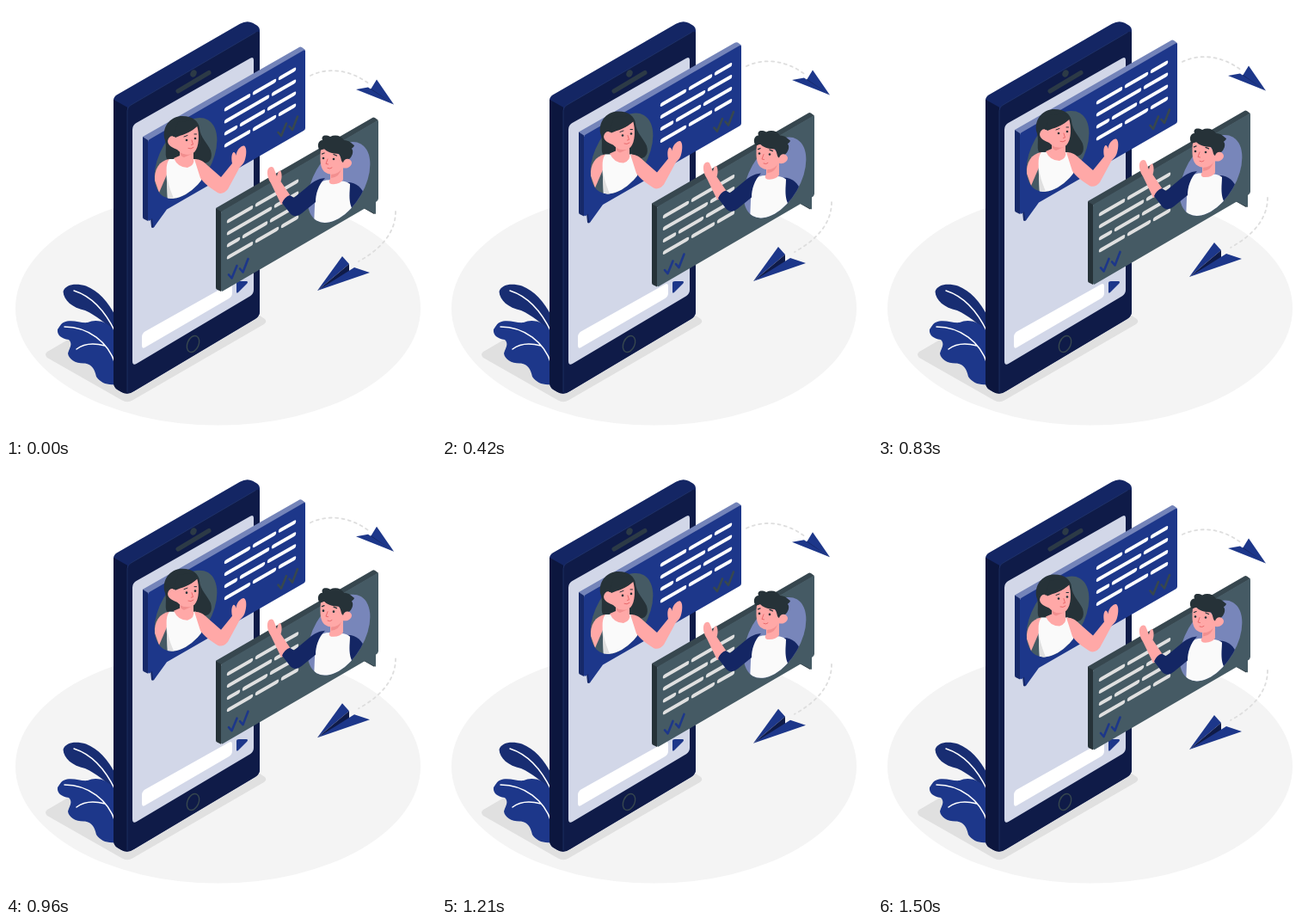
Recreate the animation shown at these times as an HTML page. Size 500 by 500 pixels, loop 1.54 s.

```html
<!DOCTYPE html>
<html lang="en">
<head>
<meta charset="utf-8">
<title>Chat bubbles</title>
<style>
html, body { margin: 0; width: 100%; height: 100%; overflow: hidden; background: #fff; }
svg { display: block; width: 100%; height: 100%; }
.blue { fill: #1d378a; }
.navy { fill: #142664; }
.deep { fill: #0f1b48; }
.ink { fill: #263238; }
.slate { fill: #455a64; }
.skin { fill: #ffa8a7; }
.shirt { fill: #fafafa; }
.line { fill: none; stroke-linecap: round; stroke-linejoin: round; }
</style>
</head>
<body>
<svg viewBox="0 0 500 500">
  <defs>
    <path id="rows" class="line" stroke-width="4.500" transform="skewY(-30)"
      d="M2 0H28M35 0H58M65 0H81M2 14H50M57 14H81M2 28H13M20 28H45M52 28H81M2 42H28M35 42H58M65 42H81"/>
    <path id="ticks" class="line" stroke-width="2.600" d="M0 12.500L3.500 16.500L9.500 2M13 5.500L16.500 9.500L22.500 -6"/>
    <circle id="disc" r="42" transform="matrix(.866 -.5 0 1 0 0)"/>
    <clipPath id="girlClip"><circle r="42" transform="matrix(.866 -.5 0 1 209 177)"/></clipPath>
    <clipPath id="manClip"><circle r="42" transform="matrix(.866 -.5 0 1 387 205)"/></clipPath>
  </defs>

  <!-- floor and shadow -->
  <ellipse cx="246.500" cy="351.500" rx="235.500" ry="136" fill="#f4f4f4"/>
  <path fill="#e0e0e0" d="M48 402L120 360L295 360L301 364Q304 367 300 370L147 458.500Q141 462 135 458.500L48 409Q44 405 48 402Z"/>

  <!-- plant -->
  <path fill="#182d72" d="M127 380C115 368 105 360 92 354C77 351 67 342 66.500 332C69 323 82 322 93 325.500C107 331 119 344 127 360Z"/>
  <path class="blue" d="M127 440C117 441 110 438 105 431C103 422 100 417 92 415.500C81 416 73 411 72 404C74 397 78 393 73 388C64 387 59 382 60 376C63 372 64 368 71 366.500C80 365 88 369 95 368C105 363 119 367 127 379Z"/>
  <path class="line" stroke="#fff" stroke-width="1.500" d="M79 331C101 338 116 356 127 379M68 373C96 373 119 391 127 416M82 399C91 392 104 392 115 395"/>

  <!-- phone -->
  <g transform="translate(0 .8)">
    <path class="navy" d="M125 109Q125 105 129 102.500L272 20Q280 15.500 287 19L292 22Q295 24 295 28V354Q295 360 290 363L149 447Q141 452 134 448L129 445Q125 442 125 437Z"/>
    <path fill="#0c163e" d="M125 108L141 117V450Q137 450 134 448L129 445Q125 442 125 437Z"/>
    <path class="deep" d="M141 121Q141 117 145 114.500L290 30Q295 27 295 32V354Q295 360 290 363L149 447Q145 450 141 450Z"/>
    <path class="line" stroke="#24396f" stroke-width=".7" d="M141 448V121Q141 117 145 114.500L290 30"/>
    <path fill="#d2d7e8" d="M147 143Q147 138 151 135.500L284 60Q288 57.500 288 62V329Q288 334 284 336.500L152 415Q147 418 147 412Z"/>
    <path fill="#fff" d="M158 384Q158 380 162 377.500L259 323Q263 320.500 263 325V333Q263 337 259 339.500L162 396Q158 398.500 158 394Z"/>
  </g>
  <path class="line" stroke="#2c3a46" stroke-width="5" d="M200 99L236 77.500"/>
  <ellipse cx="218" cy="78.500" rx="3.500" ry="4.300" transform="rotate(25 218 78.500)" fill="#2c3a46"/>
  <ellipse cx="217.500" cy="393" rx="6.500" ry="10" transform="rotate(24 217.500 393)" fill="none" stroke="#37474f" stroke-width="1.400"/>
  <path class="blue" d="M268 322Q268 320 271 320H280Q282 321 280 323L270 333Q268 335 268 332Z"/>

  <g id="bubbles">
    <!-- her message -->
    <path fill="#7484b9" d="M159 152L340 48.500Q342 47 344 48L348 51L165 157Z"/>
    <path fill="#162969" d="M159 152L165 156V250L160 247.500Q159 247 159 245ZM168 247L169 257Q170 259 172 257L180 242Z"/>
    <path class="blue" d="M165 158Q165 156 167 155L346 51.500Q348 50.500 348 52.500V142Q348 144 346 145L187 236.500L171.500 258L170 247L167 249.500Q165 250.500 165 248Z"/>
    <use href="#disc" x="209" y="177" class="slate"/>
    <use href="#rows" transform="translate(254 121)" stroke="#fff"/>
    <use href="#ticks" x="316.500" y="134.500" stroke="#37474f"/>

    <path class="ink" d="M184 153C182 138 193 128 205 128C217 128 224 134 225 142C226 153 234 159 238 168C241 178 236 183 229 183C224 183 219 179 214 177L187 178C184 172 188 163 184 153Z"/>
    <g clip-path="url(#girlClip)">
      <path class="skin" d="M190 178C178 180 172 190 173 203L178 217L187 196Z"/>
      <path class="shirt" d="M190 178C185 184 187 195 187 204L188 228H229L227 200Q229 188 221 178Z"/>
      <path fill="#e0e0e0" d="M186.500 194C188 206 191 214 196 226H188Z"/>
    </g>
    <path class="skin" d="M219 178C226 178 230 181 234 185L250 199L263 183C262 178 262 173 264 170.500C266 169 267 172 267.500 174C268 168 273 162 277 162.500C280 164 280 173 277.500 180C276 184 273 186 271.500 188L258 213Q252 220 246 217C238 212 230 206 226 200Z"/>
    <path class="skin" d="M195 177L202 174V168L218 169V177Q220 185 211 188Q200 188 195 177Z"/>
    <path fill="#f28f8f" d="M202 170Q208 174 216 172L207 176Q203 175 202 170Z"/>
    <path class="skin" d="M197 153C203 150 216 148 222 139C225 148 225 164 219 170C213 174 204 173 199 167C195 165 188 163 188 157C189 151 194 150 197 153Z"/>
    <path class="ink" d="M194 152C203 150 215 147 223 139.500L218 133L200 135Z"/>
    <circle cx="210" cy="156" r="1.300" class="ink"/>
    <circle cx="220" cy="154" r="1.300" class="ink"/>
    <path class="line" stroke="#263238" stroke-width="1" d="M207 152L211 150.500M219 149L221.500 149"/>
    <path class="line" stroke="#e9696c" stroke-width="1" d="M216 156L217.500 161L215.500 161.500M212 165.500Q215 167 218 164.500"/>

    <!-- his message -->
    <path fill="#37474f" d="M244 235L426 130Q427 129 429 130L433 133L250 240Z"/>
    <path fill="#263238" d="M244 235L250 239V332L245 329.500Q244 329 244 327ZM414 234L428 242L430 240L424 230Z"/>
    <path class="slate" d="M250 241Q250 239 252 238L431 133.500Q433 132.500 433 134.500V224Q433 226 430 228V242L417 235.500L252 331.500Q250 332.500 250 330Z"/>
    <use href="#disc" x="387" y="205" fill="#7886ba"/>
    <use href="#rows" transform="translate(257 251)" stroke="#e0e0e0"/>
    <use href="#ticks" x="259" y="300" stroke="#1d378a"/>

    <g clip-path="url(#manClip)">
      <path class="navy" d="M397 205C408 205 414 212 417 220L400 242Z"/>
      <path class="shirt" d="M360 208C368 202 378 201 385 204Q394 202 400 207C400 217 397 229 405 240L380 256H358Z"/>
    </g>
    <path class="skin" d="M320 231L308 206C304.500 201 303 194 304.500 190C306 187 309 186 311 188C313 192 314 196 315 198C316 194 317 191 319 191.500C321 194 321 200 319.500 204L333 224Z"/>
    <path class="navy" d="M371 200C362 201 358 204 353 208L335 223L330 220Q324 222 321 229L331 242Q337 247 344 241L360 228C360 219 363 208 371 200Z"/>
    <path class="skin" d="M377 191L392 184V202Q388 208 378 207Q374 205 377 201Z"/>
    <path fill="#f28f8f" d="M378 196Q385 194 390 189Q388 199 378 200Z"/>
    <path class="skin" d="M366 167C372 165 385 166 391 178C394 176 401 177 402 182C402 187 396 190 391 188C388 194 383 196 377 195.500C368 194 364 188 366 167Z"/>
    <path class="ink" d="M365 168C361 163 363 156 368 156C366 151 371 149 377 152C383 149 390 151 393 156C399 156 402 160 405 162C405 164 402 165 402 166C405 169 402 176 399 178C395 177 393 179 392 182C389 181 390 175 387 172C380 172 372 169 370 166Z"/>
    <circle cx="369" cy="177" r="1.300" class="ink"/>
    <circle cx="381" cy="178" r="1.300" class="ink"/>
    <path class="line" stroke="#263238" stroke-width="1.300" d="M367.500 172L370 171M381 172.500L384.500 174"/>
    <path class="line" stroke="#e9696c" stroke-width="1" d="M374 178L372 183.500L374.500 184M374 188.500Q377 190 379 188"/>
  </g>

  <g id="planes">
    <path class="line" stroke="#dedede" stroke-width="1.800" stroke-dasharray="3 4.500" d="M354 81C372 72 399 72 424 92M453 239C453 263 437 282 410 297"/>
    <path class="blue" d="M431 85.500L451 114.500L424 97Z"/>
    <path class="deep" d="M424 96V101L451 114.500Z"/>
    <path class="blue" d="M407 97L421 94.500L451 114.500Z"/>
    <path class="blue" d="M362 331L391 291L399 300Z"/>
    <path class="deep" d="M362 331L399 300V310Z"/>
    <path class="blue" d="M362 331L405 304L423 310Z"/>
  </g>
</svg>
<script>
const PERIOD = 1540, LEAD = 45;
const bubbles = document.getElementById('bubbles');
const planes = document.getElementById('planes');

function shift(group, travel, lift) {
  group.setAttribute('transform', `translate(0 ${travel * (0.058 - lift)})`);
}

// Linear rise and fall; the planes travel twice as far as the bubbles.
function draw(now) {
  const phase = ((now + LEAD) / PERIOD) % 1;
  const lift = 1 - Math.abs(1 - 2 * phase);
  shift(bubbles, 10, lift);
  shift(planes, 20, lift);
}

const start = performance.now();
function tick() {
  draw(performance.now() - start);
  requestAnimationFrame(tick);
}
tick();
</script>
</body>
</html>
```
